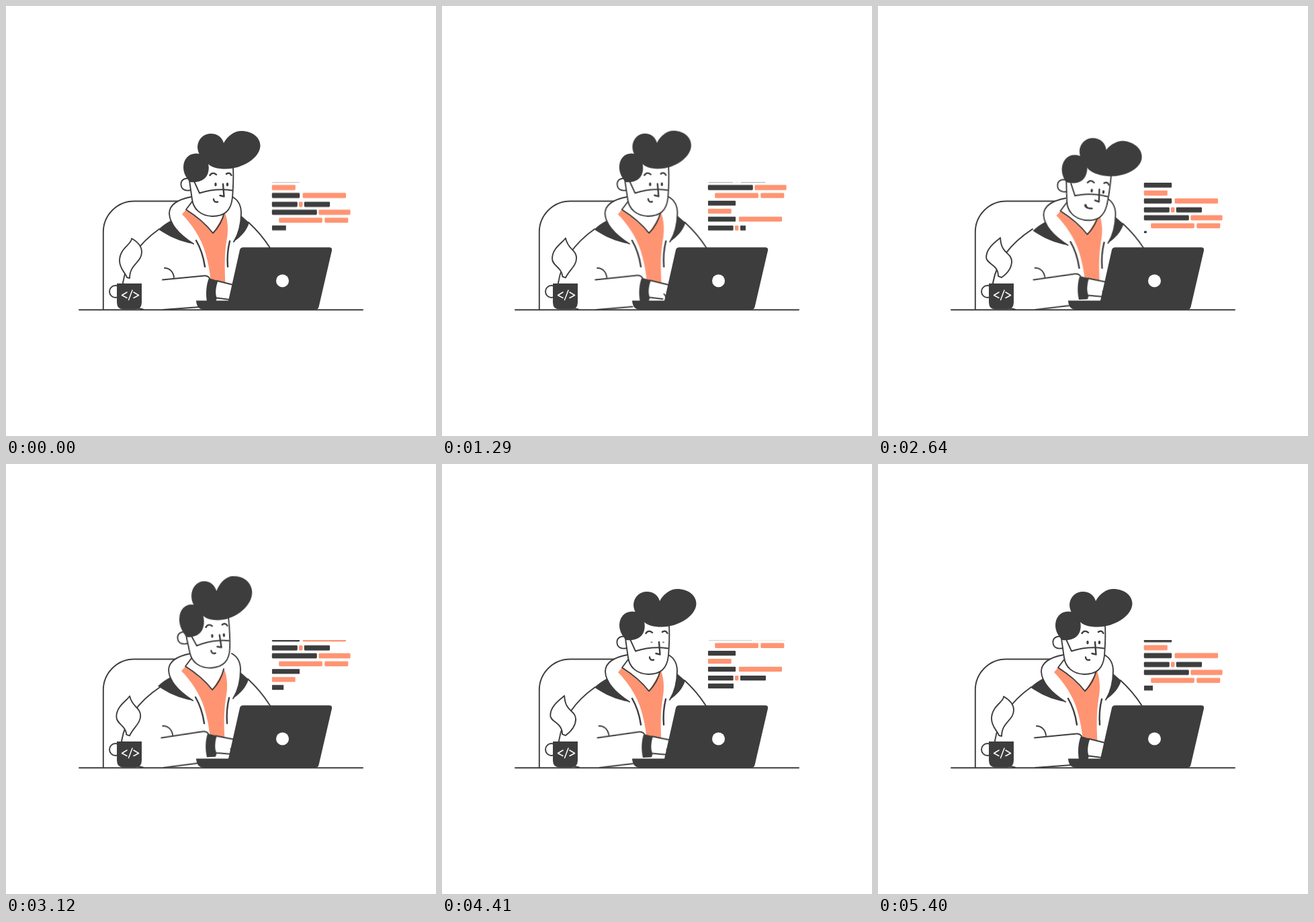
These frames come from a looping animation (640 px wide and 640 px high, 5430 ms). An HTML page without scripts:

```html
<!DOCTYPE html>
<html lang="en">
<head>
<meta charset="utf-8">
<title>Developer at work</title>
<style>
html, body { margin: 0; width: 100%; height: 100%; overflow: hidden; background: #fff; }
svg { display: block; width: 100vw; height: 100vh; }
.line { fill: none; stroke: #3d3d3d; stroke-width: 1.9; stroke-linecap: round; stroke-linejoin: round; }
.thick { stroke-width: 2.4; }
.white { fill: #fff; }
.dark { fill: #3d3d3d; }
.coral { fill: #ff9472; }

/* Figure */
.body, .sleeve, .head, .hair, .side, .face, .brows, .gaze, .mouth, .arm { animation: 5430ms ease-in-out infinite; }
.body { animation-name: body; transform-origin: 308px 400px; }
.sleeve { animation-name: sleeve; transform-origin: 207px 400px; }
.head { animation-name: head; transform-origin: 300px 310px; }
.hair { animation-name: hair; transform-origin: 290px 240px; }
.side { animation-name: side; }
.face { animation-name: face; }
.brows { animation-name: brows; }
.gaze { animation-name: gaze; }
.mouth { animation-name: mouth; transform-origin: 312px 290px; }
.arm { animation-name: arm; transform-origin: 233px 430px; }
.eyes { animation: blink 5430ms linear infinite; transform-origin: 320px 265.5px; }

@keyframes body {
  0%, 14%, 81.2%, 100% { transform: none; }
  33.7%, 42% { transform: scaleX(1.014); }
  48%, 51% { transform: translate(3.5px, 2px); }
  57.1% { transform: translate(-1px, -2px); }
  66.8% { transform: translate(1px, .3px); }
}
@keyframes sleeve {
  0%, 14%, 66.8%, 100% { transform: none; }
  33.7%, 42% { transform: translateX(-2px); }
  48%, 51% { transform: scaleX(1.09); }
}
@keyframes head {
  0%, 81.2%, 100% { transform: none; }
  13.8% { transform: translate(-.4px, -.3px) rotate(-.6deg); }
  33.7%, 42% { transform: translate(-.5px, 0); }
  48%, 51% { transform: translate(1.5px, 5px) rotate(6.5deg); }
  57.1% { transform: translate(-2px, -9px) rotate(-4deg); }
  66.8% { transform: translate(.6px, .9px) rotate(1.1deg); }
}
@keyframes hair {
  0%, 66.8%, 100% { transform: none; }
  13.8% { transform: scaleX(.985); }
  33.7%, 42% { transform: translateX(-2px) scaleX(.89); }
  48%, 51% { transform: translateY(-1px) rotate(4deg); }
  57.1% { transform: scale(.97, 1.13); }
}
@keyframes side {
  0%, 13.8%, 48%, 100% { transform: none; }
  33.7%, 42% { transform: translateX(2px); }
}
@keyframes face {
  0%, 48%, 100% { transform: none; }
  13.8% { transform: translateX(-.5px); }
  33.7%, 42% { transform: translateX(-2.6px); }
}
@keyframes brows {
  0%, 42%, 57.1%, 100% { transform: none; }
  48%, 51% { transform: translate(1px, 5px); }
}
@keyframes gaze {
  0%, 42%, 57.1%, 100% { transform: none; }
  48%, 51% { transform: translateY(2.6px); }
}
@keyframes mouth {
  0%, 42%, 57.1%, 100% { transform: none; }
  48%, 51% { transform: translate(-2px, 3px) scaleX(1.6); }
}
@keyframes arm {
  0%, 100% { transform: none; }
  13.8% { transform: translateX(-2px) rotate(-1deg); }
  33.7% { transform: translateX(-7px); }
  48.6% { transform: translateX(-.5px) rotate(-2.6deg); }
  66.8% { transform: translateX(-.5px) rotate(-3.7deg); }
  81.2% { transform: translateX(-.5px) rotate(-2.6deg); }
}
@keyframes blink {
  0%, 79.6%, 83%, 100% { transform: none; }
  80.7%, 81.8% { transform: scaleY(.3); }
}

/* Code: each bar is typed in turn while the rows step upwards */
.code rect { height: 7.6px; rx: 1.4px; }
.tape, .live rect { animation: 2715ms linear -105ms infinite; }
.tape { animation-name: tape; }
.live .a { animation-name: a; }
.live .b { animation-name: b; }
.live .c1 { animation-name: c1; }
.live .c2 { animation-name: c2; }
.live .d1 { animation-name: d1; }
.live .d2 { animation-name: d2; }
.live .d3 { animation-name: d3; }
.live .e1 { animation-name: e1; }
.live .e2 { animation-name: e2; }
.live .f1 { animation-name: f1; }
.live .f2 { animation-name: f2; }

@keyframes tape {
  0% { transform: translateY(338.2px); }
  3.87%, 8.47% { transform: translateY(326.6px); }
  12.3%, 15.65% { transform: translateY(314.8px); }
  19.5%, 38.3% { transform: translateY(303px); }
  42.2%, 59.1% { transform: translateY(289.8px); }
  63%, 80.8% { transform: translateY(278px); }
  84.7%, 100% { transform: translateY(266.2px); }
}
@keyframes a {
  0% { clip-path: inset(0 100% 0 0); animation-timing-function: cubic-bezier(.4, .2, .6, .8); }
  7.73%, 100% { clip-path: inset(0 0 0 0); }
}
@keyframes b { 0%, 8.47% { clip-path: inset(0 100% 0 0); } 15.65%, 100% { clip-path: inset(0 0 0 0); } }
@keyframes c1 { 0%, 15.65% { clip-path: inset(0 100% 0 0); } 23.2%, 100% { clip-path: inset(0 0 0 0); } }
@keyframes c2 { 0%, 23.2% { clip-path: inset(0 100% 0 0); } 38.3%, 100% { clip-path: inset(0 0 0 0); } }
@keyframes d1 { 0%, 38.3% { clip-path: inset(0 100% 0 0); } 47.3%, 100% { clip-path: inset(0 0 0 0); } }
@keyframes d2 { 0%, 47.3% { clip-path: inset(0 100% 0 0); } 49.4%, 100% { clip-path: inset(0 0 0 0); } }
@keyframes d3 { 0%, 49.4% { clip-path: inset(0 100% 0 0); } 58.9%, 100% { clip-path: inset(0 0 0 0); } }
@keyframes e1 { 0%, 59.1% { clip-path: inset(0 100% 0 0); } 71.8%, 100% { clip-path: inset(0 0 0 0); } }
@keyframes e2 { 0%, 71% { clip-path: inset(0 100% 0 0); } 80.7%, 100% { clip-path: inset(0 0 0 0); } }
@keyframes f1 { 0%, 80.8% { clip-path: inset(0 100% 0 0); } 93%, 100% { clip-path: inset(0 0 0 0); } }
@keyframes f2 { 0%, 93% { clip-path: inset(0 100% 0 0); } 99.9%, 100% { clip-path: inset(0 0 0 0); } }
</style>
</head>
<body>
<svg viewBox="0 0 640 640">
  <defs>
    <clipPath id="pane"><rect x="390" y="262.5" width="130" height="74.9"/></clipPath>
  </defs>

  <!-- Chair -->
  <path class="line" d="M144.800 452V336.500A46 46 0 0 1 190.800 290.500H272"/>

  <path class="line sleeve" d="M228 332C204 349 180 375 174 412C176 438 188 450 204 451.500"/>
  <g class="body">
    <path class="line" d="M361 322C373 333 384 346 393 360L398 368"/>
    <path class="white" d="M276 284C255 288 243 296 243 309C244 328 262 343 279 354L310 400L339 351C347 338 350 322 350 308C350 298 346 289 337 284Z"/>
    <path class="coral" d="M262 310C276 324 290 345 296 365C301 382 304 395 306 424H327C325 385 325 370 329 345C331 333 330 318 326 308L308 338C298 326 280 312 268 303Z"/>
    <path class="dark" d="M246 319C238 323 232 328 227 332.500C242 343 260 351 279 354C264 344 251 333 246 319Z"/>
    <path class="dark" d="M350 312L362 322.500C358 335 350 343 339 351C345 340 349 326 350 312Z"/>
    <path class="line" d="M276 284C255 288 243 296 243 309C244 328 262 343 279 354"/>
    <path class="line" d="M337 284C346 289 350 298 350 308C350 325 346 340 339 351"/>
    <path class="line" d="M277 291L268 303C282 312 298 325 308 338C316 330 322 320 325 307"/>
    <path class="line thick" d="M283 349C290 361 294 374 296 388M333 350C330 362 329 375 330 388"/>
  </g>

  <g class="head">
    <g class="side">
      <path class="line" style="fill:#fff" d="M274 257C266 255 260 259 260.500 266C261 273 267 276 275 274"/>
    </g>
    <path class="line" style="fill:#fff" d="M338 240C339 258 338 272 337 285C335 305 325 313 307 313C289 312 279 302 277 288L273 260"/>
    <path class="line" d="M280 261L288 278.500C302 274 320 272 337 274.500"/>
    <g class="face">
      <path class="line thick" d="M323 265L324.500 283.500L318.500 282"/>
      <path class="line thick brows" d="M303.500 252C306 248 310 248 313 251M328 250C331 247.500 334 249 335.500 252"/>
      <path class="line thick mouth" d="M309 287.500C309 291 312 292.500 315 291.500"/>
      <g class="gaze">
        <g class="eyes dark">
          <ellipse cx="312" cy="265.500" rx="1.700" ry="2.700"/>
          <ellipse cx="329.500" cy="265.500" rx="1.700" ry="2.700"/>
        </g>
      </g>
    </g>
    <g class="hair dark">
      <path d="M264 240C264 228 272 219.500 283 219.500C291 219.500 297 224 300 231C303 240 302 248 298 254C293 261 283 263 274 262C268 256 264 248 264 240Z"/>
      <path d="M300 234C291 228 285 219 285 209C286 197 295 190 305 190C315 190 322 196 324 204C330 193 340 186 350 186C367 186 378.500 196 378.500 208C378 226 352 242.500 327 242.500C315 242.500 304 240 300 234Z"/>
    </g>
  </g>

  <g class="arm">
    <path class="white" d="M233 407L295 401Q301 401 303 406L340 416L333 437L300 438L288 448L233 452Z"/>
    <path class="line" d="M236 390C243 390 249 395 250 404"/>
    <path class="line" d="M233 407.500L295 401.500Q300 401 303 405"/>
    <path class="line" d="M234 452L288 448"/>
    <path class="line" d="M314 409L342 416M314 434.500L333 437M335 429.500L340 437"/>
    <path class="dark" d="M302 405L315.500 409C312 419 311 428 314 435L312 440H299C297 428 298 415 302 405Z"/>
  </g>

  <!-- Laptop -->
  <path class="dark" d="M283 438.500H340V452H295Q284 452 283 438.500Z"/>
  <path class="dark" d="M353 359.300H481Q486 359.300 485 364L465.500 448Q464.500 452 460 452H328L348 363Q349 359.300 353 359.300Z"/>
  <circle class="white" cx="411.500" cy="409" r="9.500"/>

  <path class="line" d="M109 452.200H531"/>

  <!-- Mug -->
  <circle class="line" style="fill:#fff" cx="163" cy="425" r="9"/>
  <path class="dark" d="M165 413H202V441Q202 451.500 192 451.500H175Q165 451.500 165 441Z"/>
  <path class="line" style="stroke:#fff;stroke-width:1.5" d="M180 426L172.500 430.500L180 434.500M188 423L182.500 437.500M190 426L197.500 430.500L190 434.500"/>
  <path class="line" style="fill:#fff" d="M187 346C188 354 169 360 169 379C169 391 177 396 180 404L184 405C184 384 202 382 202 366C202 356 194 350 187 346Z">
    <animate attributeName="d" dur="1810ms" repeatCount="indefinite" calcMode="spline" keyTimes="0;.5;1" keySplines=".4 0 .6 1;.4 0 .6 1"
      values="M187 346C188 354 169 360 169 379C169 391 177 396 180 404L184 405C184 384 202 382 202 366C202 356 194 350 187 346Z;M182 345C176 350 161 360 161 374C161 384 179 384 179 402L184 404C193 398 199 390 199 380C198 366 183 370 182 345Z;M187 346C188 354 169 360 169 379C169 391 177 396 180 404L184 405C184 384 202 382 202 366C202 356 194 350 187 346Z"/>
  </path>

  <g class="code" clip-path="url(#pane)">
    <g class="tape">
      <g class="dark" transform="translate(-.2 -72)">
        <rect x="396" y="0" width="41.400"/>
        <rect x="396" y="11.800" width="35" class="coral"/>
        <rect x="396" y="23.600" width="41.400"/>
        <rect x="441.800" y="23.600" width="64.500" class="coral"/>
        <rect x="396" y="36.800" width="38"/>
        <rect x="436.200" y="36.800" width="5.500" class="coral"/>
        <rect x="444" y="36.800" width="38.300"/>
        <rect x="396" y="48.600" width="67"/>
        <rect x="465.600" y="48.600" width="47.200" class="coral"/>
        <rect x="406.400" y="60.400" width="64.600" class="coral"/>
        <rect x="474.500" y="60.400" width="35" class="coral"/>
      </g>
      <g class="live dark" transform="translate(-.2 0)">
        <rect x="396" y="0" width="41.400" class="a"/>
        <rect x="396" y="11.800" width="35" class="b coral"/>
        <rect x="396" y="23.600" width="41.400" class="c1"/>
        <rect x="441.800" y="23.600" width="64.500" class="c2 coral"/>
        <rect x="396" y="36.800" width="38" class="d1"/>
        <rect x="436.200" y="36.800" width="5.500" class="d2 coral"/>
        <rect x="444" y="36.800" width="38.300" class="d3"/>
        <rect x="396" y="48.600" width="67" class="e1"/>
        <rect x="465.600" y="48.600" width="47.200" class="e2 coral"/>
        <rect x="406.400" y="60.400" width="64.600" class="f1 coral"/>
        <rect x="474.500" y="60.400" width="35" class="f2 coral"/>
      </g>
    </g>
  </g>
</svg>
</body>
</html>
```
